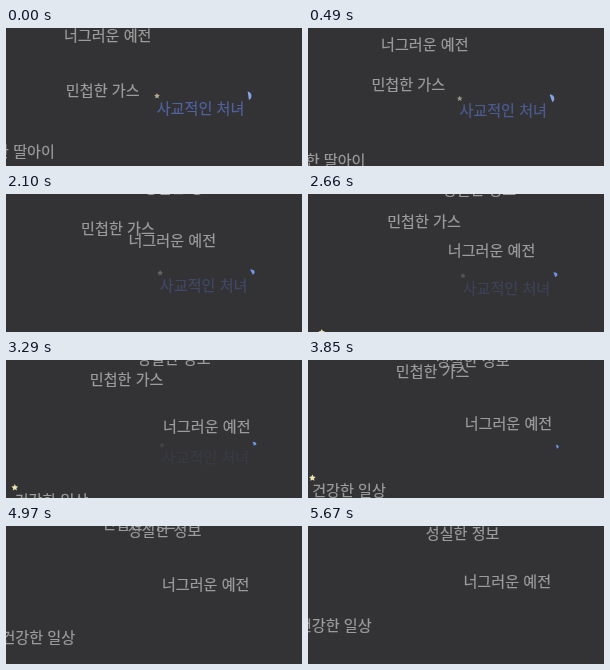
Recreate the animation shown at these times as an HTML page. Size 296 by 138 pixels, loop 5740 ms.

```html
<!DOCTYPE html>
<html lang="ko">
<head>
<meta charset="utf-8">
<style>
  html, body { margin: 0; height: 100%; overflow: hidden; background: #333335; }
  svg { display: block; width: 296px; height: 138px; }
  text { font: 500 15.1px "Noto Sans CJK KR", "Noto Sans CJK", sans-serif; text-anchor: middle; fill: #9c9c9d; stroke: #9c9c9d; stroke-width: .2px; }
</style>
</head>
<body>
<svg viewBox="0 0 296 138"></svg>
<script>
const LOOP = 5740, STEP = 70;
const svg = document.querySelector('svg');

// Each phrase drifts in straight lines between [time, centre x, centre y].
const phrases = [
  { text: '너그러운 예전', path: [[0, 101.7, 6.8], [3220, 200.8, 66.5], [LOOP, 199.2, 54.6]] },
  { text: '민첩한 가스', path: [[0, 96.7, 62.2], [LOOP, 138.4, -13.3]] },
  { text: '성실한 정보', path: [[0, 186, -15], [LOOP, 154.3, 7.2]] },
  { text: '착한 딸아이', path: [[0, 12, 122.6], [LOOP, 113, 239]] },
  { text: '건강한 일상', path: [[0, 71.4, 196.5], [LOOP, 26.2, 97.6]] },
  { text: '사교적인 처녀', path: [[0, 194.5, 80], [LOOP, 203.1, 110]] },
];

function add(tag, attrs) {
  const el = document.createElementNS('http://www.w3.org/2000/svg', tag);
  set(el, attrs);
  return svg.appendChild(el);
}

function set(el, attrs) {
  for (const name in attrs) el.setAttribute(name, attrs[name]);
}

const clamp = v => Math.max(0, Math.min(1, v));
const mix = (a, b, p) => a + (b - a) * p;

function along(path, t) {
  const i = Math.max(1, path.findIndex(k => k[0] >= t));
  const [t0, x0, y0] = path[i - 1], [t1, x1, y1] = path[i];
  const p = (t - t0) / (t1 - t0);
  return [mix(x0, x1, p), mix(y0, y1, p)];
}

const starPoints = Array.from({ length: 10 }, (_, i) => {
  const r = i % 2 ? 1.7 : 3.5, a = i * Math.PI / 5 - Math.PI / 2;
  return [r * Math.cos(a), r * Math.sin(a)].map(v => v.toFixed(2));
}).join(' ');

for (const phrase of phrases) {
  phrase.el = add('text', {});
  phrase.el.textContent = phrase.text;
}
const [bright, blue] = phrases.slice(-2);
blue.el.style.fill = blue.el.style.stroke = '#50629f';
const brightStar = add('polygon', { points: starPoints, fill: '#eee6b4' });
const paleStar = add('polygon', { points: starPoints });
const moon = add('path', { d: 'M-2 -4.3C3 -4 3.4 3 -.6 4.3Q-1 1 -2 -4.3Z' });

function draw(t) {
  for (const phrase of phrases) {
    const [x, y] = phrase.at = along(phrase.path, t);
    set(phrase.el, { x, y: y + 5.9 });
  }

  const [bx, by] = bright.at;
  set(brightStar, { transform: `translate(${bx - 36.7} ${by - 12.2})` });

  const [x, y] = blue.at;
  const fade = clamp(1 - t / 3850);
  blue.el.style.opacity = fade;
  set(paleStar, {
    transform: `translate(${x - 43.5} ${y - 12}) scale(0.85)`,
    fill: t < 300 ? '#b5ad8a' : '#a5a397',
    opacity: fade,
  });

  const late = clamp((t - 3300) / 1100);
  const tilt = -20 * Math.sin(Math.PI * clamp(t / 2800));
  const tall = mix(1, 0.45, clamp(t / 3300));
  set(moon, {
    transform: `translate(${x + 49} ${y - mix(12.2, 13.5, clamp(t / 3300))}) rotate(${tilt}) scale(${mix(0.95, 0.4, late)} ${tall})`,
    fill: late > 0.6 ? '#85899a' : t < 1000 ? '#86a2e2' : '#7095e4',
    opacity: clamp((4900 - t) / 600),
  });
}

function tick(now) {
  draw(Math.floor(now % LOOP / STEP) * STEP);
  requestAnimationFrame(tick);
}
requestAnimationFrame(tick);
</script>
</body>
</html>
```
